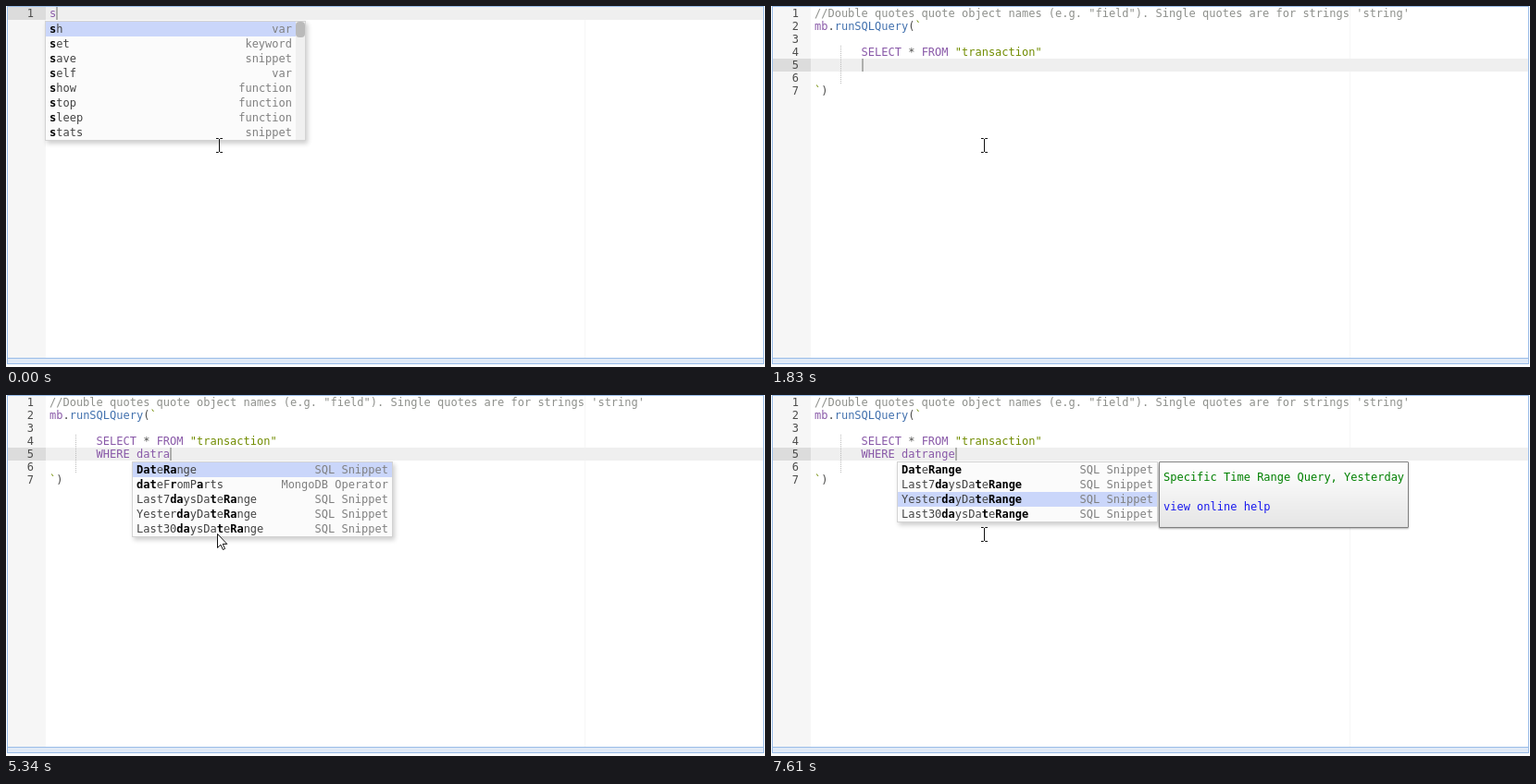
An HTML page that plays this animation: 820x391 px, repeating every 8 s.

```html
<!DOCTYPE html>
<html lang="en">
<head>
<meta charset="utf-8">
<title>SQL editor autocomplete</title>
<style>
html, body { margin: 0; width: 100%; height: 100%; overflow: hidden; background: #fff; }
#stage { position: relative; width: 820px; height: 391px; overflow: hidden;
  font: 12px/14px "DejaVu Sans Mono", monospace; color: #4d4d4c; white-space: pre; }
#stage div, svg { position: absolute; box-sizing: border-box; }
.panel { left: 1px; top: 0; width: 818px; height: 388px; border: 1px solid #99bce8; }
.bar { left: 1px; top: 381px; width: 818px; height: 7px; background: #dfe9f6; border: 1px solid #99bce8; }
.gutter { left: 2px; top: 1px; width: 41px; height: 380px; background: #f6f6f6; }
.margin { left: 625px; top: 1px; width: 1px; height: 380px; background: #f6f6f6; }
.active { left: 43px; width: 775px; height: 14px; background: #efefef; }
.active-num { left: 2px; width: 41px; height: 14px; background: #dcdcdc; }
.num { left: 2px; width: 28px; text-align: right; }
.line { left: 47px; }
.guide { left: 75px; top: 43px; width: 1px;
  background: repeating-linear-gradient(#bbb 0 1px, transparent 1px 2px); }
.bracket { left: 147px; top: 14px; width: 9px; height: 15px; border: 1px solid #d1d1d1; border-radius: 2px; }
.caret { width: 2px; height: 14px; background: #aeafad; }
.k { color: #8959a8; } .f { color: #4271ae; } .s { color: #718c00; } .c { color: #8e908c; }
.popup { width: 282px; border: 1px solid #d3d3d3; background: #fbfbfb; color: #444;
  box-shadow: 2px 3px 5px rgba(0,0,0,.2); line-height: 16px; }
.row { left: 0; width: 280px; height: 16px; padding-left: 4px; }
.row.sel { background: #cad6fa; }
.row b { color: #000; }
.kind { top: 0; color: #808080; }
.track { right: 0; top: 0; width: 10px; height: 100%; background: #f0f0f0; }
.thumb { left: 0; top: 0; width: 10px; background: #bababa; border-radius: 4px; }
.tip { border: 1px solid gray; border-radius: 1px; padding: 3px 4px; color: #000;
  background: #fff linear-gradient(transparent, rgba(0,0,0,.1)); box-shadow: 0 1px 2px rgba(0,0,0,.3); }
.tip.rich { height: 72px; padding-top: 8px; line-height: 16px; color: #008000; }
.tip u { color: #1a1aee; text-decoration: none; }
</style>
</head>
<body>
<div id="stage"></div>
<script>
const LOOP = 8000, CHAR = 7.224, LEFT = 47;
const stage = document.getElementById('stage');

const span = (cls, text) => `<span class="${cls}">${text}</span>`;
const box = (cls, style = '', html = '') => `<div class="${cls}" style="${style}">${html}</div>`;
const lineTop = n => 1 + 14 * (n - 1);
const colX = c => LEFT + c * CHAR;

const indent = ' '.repeat(7);
const head = [
  span('c', `//Double quotes quote object names (e.g. "field"). Single quotes are for strings 'string'`),
  `${span('k', 'mb')}.${span('f', 'runSQLQuery')}(${span('s', '`')}`,
  '',
  `${indent}${span('k', 'SELECT')} * ${span('k', 'FROM')} ${span('s', '"transaction"')}`
];
const tail = ['', span('s', '`') + ')'];
const word = text => [span('k', text)];
const query = text => [...head, indent + span('k', text), ...tail];

// Completion rows: "name|kind"
const fill = (names, kind) => names.split(' ').map(n => n + '|' + kind);
const op = names => fill(names, 'MongoDB Operator');
const sLIST = ['sh|var', 'set|keyword', 'save|snippet', 'self|var', 'show|function',
  'stop|function', 'sleep|function', 'stats|snippet'];
const sqlList = ['sql|snippet'];
const wList = fill('WHERE WHEN WITH WHILE VIEW', 'keyword');
const whList = fill('WHERE WHEN WHILE', 'keyword');
const dateList = ['date|transaction', 'date|MongoDB Function',
  ...op('dateToParts dateToString dateFromParts dateFromString'),
  ...fill('BinData HexData', 'MongoDB Function')];
const snippets = fill('DateRange Last7daysDateRange YesterdayDateRange Last30daysDateRange', 'SQL Snippet');
const [first, ...ranges] = snippets;
const datrList = [first, ...op('dateToParts dateToString dateFromParts dateFromString'), ...ranges];
const datraList = [first, ...op('dateFromParts'), ...ranges];

const rangeTip = extra => `Specific Time Range Query${extra}\n\n<u>view online help</u>`;
const typed = (text, list, more) => ({ lines: query('WHERE ' + text), col: 13 + text.length, key: text, list, ...more });

// Each step changes part of the state from its time on
const steps = [
  [0, { lines: word('s'), row: 1, col: 1, caret: 1, key: 's', list: sLIST, thumb: 17, sel: 0,
    popCol: 0, popTop: 16, tip: '', arrow: 0, bracket: 0, guide: 0 }],
  [80, { tip: 'Sharding helper methods' }],
  [220, { lines: word('sq'), col: 2, key: 'sq', list: sqlList, thumb: 0, tip: '' }],
  [380, { lines: word('sql'), col: 3, key: 'sql' }],
  [520, { lines: [...head, ...tail], row: 6, col: 2, list: null, bracket: 1, guide: 2 }],
  [1060, { caret: 0 }],
  [1200, { caret: 1, row: 5, bracket: 0 }],
  [1360, { row: 4 }],
  [1590, { col: 34 }],
  [1830, { lines: query(''), row: 5, col: 7, guide: 3 }],
  [2280, { lines: query('w'), col: 8, key: 'w', list: wList, popCol: 7, popTop: 72, arrow: 1 }],
  [2340, { lines: query('wh'), col: 9, key: 'wh', list: whList, arrow: 0 }],
  [2650, typed('', null)],
  [3190, { caret: 0 }],
  [3570, typed('d', dateList, { caret: 1, popCol: 13, thumb: 20, arrow: 1 })],
  [3650, typed('da', dateList, { thumb: 36 })],
  [3790, typed('dat', dateList, { thumb: 64 })],
  [4420, { caret: 0 }],
  [4800, { caret: 1 }],
  [5260, typed('datr', datrList, { thumb: 0 })],
  [5340, typed('datra', datraList)],
  [5420, typed('datran', snippets, { arrow: 0 })],
  [5490, typed('datrang', snippets)],
  [5560, typed('datrange', snippets)],
  [5700, { tip: rangeTip('') }],
  [6240, { caret: 0 }],
  [6630, { caret: 1 }],
  [7160, { caret: 0, sel: 1 }],
  [7240, { tip: rangeTip(', Last 7 days') }],
  [7470, { sel: 2 }],
  [7540, { caret: 1 }],
  [7610, { tip: rangeTip(', Yesterday') }]
];
let last = {};
const states = steps.map(([, change]) => last = { ...last, ...change });

// Bold the letters of key in order, ignoring case
function mark(name, key) {
  let i = 0;
  return [...name].map(ch =>
    i < key.length && ch.toLowerCase() === key[i] ? (i++, `<b>${ch}</b>`) : ch
  ).join('').replaceAll('</b><b>', '');
}

function popup(s) {
  const left = Math.round(colX(s.popCol) - 5);
  const rows = s.list.map((item, i) => {
    const [name, kind] = item.split('|');
    return box(i === s.sel ? 'row sel' : 'row', `top:${i * 16}px`,
      mark(name, s.key) + box('kind', `right:${s.thumb ? 14 : 4}px`, kind));
  }).join('');
  const bar = s.thumb ? box('track', '', box('thumb', `height:${s.thumb}px`)) : '';
  const tip = s.tip && box(s.tip.includes('<u>') ? 'tip rich' : 'tip', `left:${left + 283}px;top:${s.popTop}px`, s.tip);
  return box('popup', `left:${left}px;top:${s.popTop}px;height:${s.list.length * 16 + 2}px`, rows + bar) + tip;
}

function pointer(arrow) {
  const shape = arrow
    ? '<path d="M2.5 .5v15l3.5-3.3 2.4 5.3 2.2-1-2.4-5.1h4.6z" fill="#fff" stroke="#111"/>'
    : '<path d="M1 .5h2.5l1 1 1-1H8M4.5 1v14M1 15.5h2.5l1-1 1 1H8" fill="none" stroke="#111"/>';
  return `<svg width="16" height="20" style="left:226px;top:${arrow ? 150 : 143}px">${shape}</svg>`;
}

function render(s) {
  const top = `top:${lineTop(s.row)}px`;
  stage.innerHTML = box('panel') + box('gutter') + box('margin') +
    box('active', top) + box('active-num', top) +
    (s.guide ? box('guide', `height:${s.guide * 14}px`) : '') +
    (s.bracket ? box('bracket') : '') +
    s.lines.map((html, i) => {
      const y = `top:${lineTop(i + 1)}px`;
      return box('num', y, i + 1) + box('line', y, html);
    }).join('') +
    (s.caret ? box('caret', `${top};left:${Math.round(colX(s.col))}px`) : '') +
    box('bar') + (s.list ? popup(s) : '') + pointer(s.arrow);
}

let shown = -1;
const start = performance.now();
function tick() {
  const t = (performance.now() - start) % LOOP;
  const i = steps.findLastIndex(([at]) => at <= t);
  if (i !== shown) render(states[shown = i]);
  requestAnimationFrame(tick);
}
tick();
</script>
</body>
</html>
```
